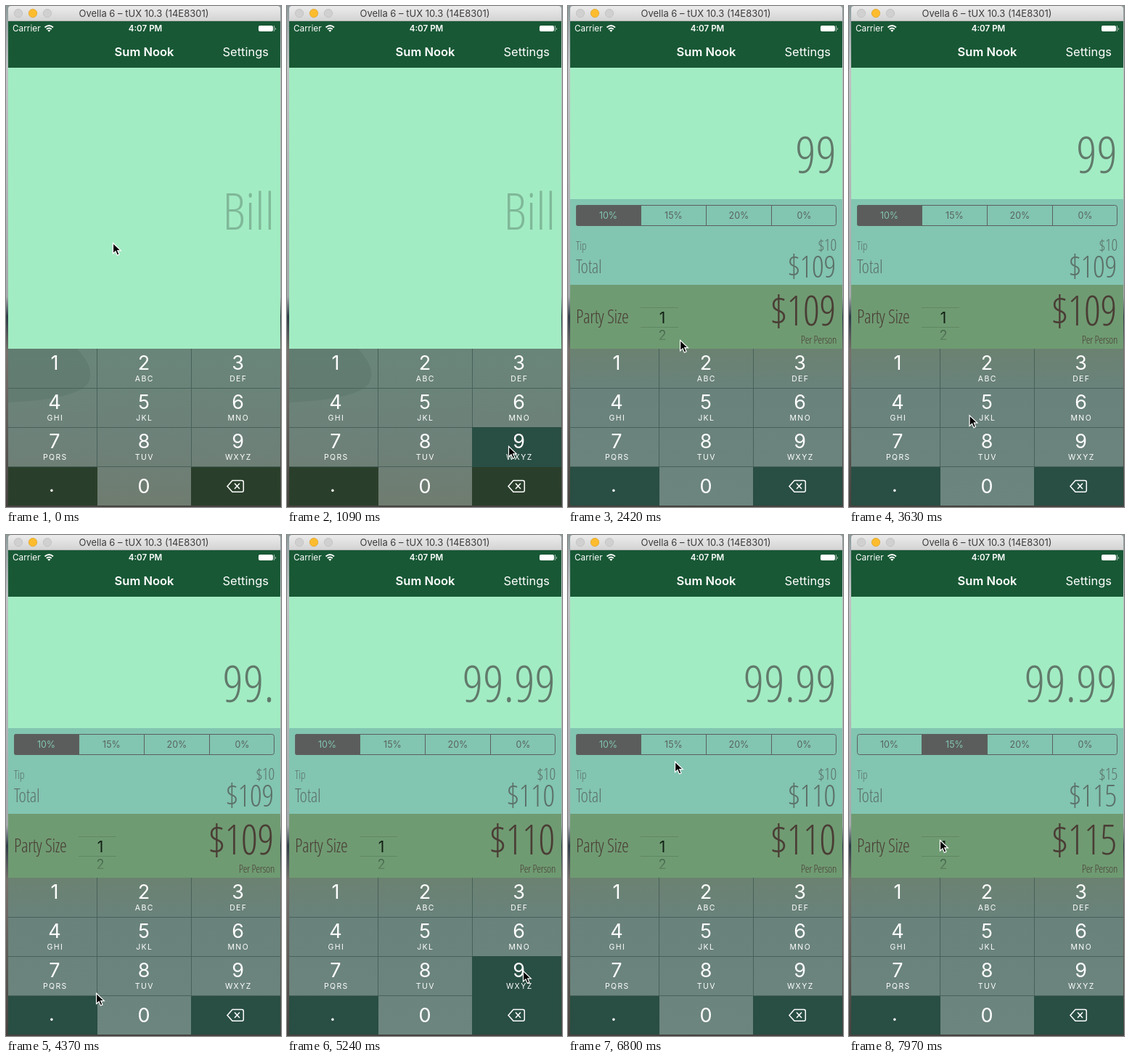
An HTML page for the animation above (8 s loop, 379 px wide and 690 px high).

```html
<!DOCTYPE html>
<html lang="en">
<head>
<meta charset="utf-8">
<style>
html, body { margin: 0; width: 100%; height: 100%; overflow: hidden; }
svg { display: block; width: 379px; height: 690px; font-family: Inter, "Open Sans", sans-serif; }
.narrow { font-family: "Open Sans", "Noto Sans", sans-serif; font-stretch: 82%; font-weight: 350; letter-spacing: -.02em; }
#bill { font-weight: 320; letter-spacing: 0; }
.end { text-anchor: end; }
.mid { text-anchor: middle; }
</style>
</head>
<body>
<svg viewBox="0 0 379 690">
  <defs>
    <linearGradient id="desk" x2="0" y2="1">
      <stop offset="0" stop-color="#8d9a9c"/><stop offset=".12" stop-color="#c0c4c6"/>
      <stop offset=".58" stop-color="#a4a9ab"/><stop offset=".62" stop-color="#303c48"/>
      <stop offset=".69" stop-color="#77716c"/><stop offset="1" stop-color="#45423f"/>
    </linearGradient>
    <linearGradient id="bar" x2="0" y2="1">
      <stop stop-color="#ececec"/><stop offset="1" stop-color="#d3d3d3"/>
    </linearGradient>
    <linearGradient id="padA" x2="0" y2="1">
      <stop stop-color="#698579"/><stop offset=".6" stop-color="#6d8179"/><stop offset="1" stop-color="#6f7c70"/>
    </linearGradient>
    <linearGradient id="padB" x2="0" y2="1">
      <stop stop-color="#6b8271"/><stop offset=".25" stop-color="#69827b"/><stop offset="1" stop-color="#6c857e"/>
    </linearGradient>
    <linearGradient id="fade" x2="0" y2="1">
      <stop stop-color="#34503a" stop-opacity=".85"/><stop offset="1" stop-color="#34503a" stop-opacity=".2"/>
    </linearGradient>
    <clipPath id="view"><path d="M3 85H378V472H3Z"/></clipPath>
    <clipPath id="wheel"><path d="M100 446H152V461H100Z"/></clipPath>
  </defs>

  <path fill="url(#desk)" d="M0 0H379V690H0Z"/>
  <path fill="url(#bar)" d="M3 21V4Q3 0 7 0H374Q378 0 378 4V21Z"/>
  <path stroke="#b4b4b4" d="M3 20.5H378"/>
  <g stroke="#bcbcbc" stroke-width=".7" fill="#d0d0d0">
    <circle cx="17" cy="10" r="5.7"/><circle cx="57" cy="10" r="5.7"/>
    <circle cx="37" cy="10" r="5.7" fill="#fdbc2e" stroke="#dfa023"/>
  </g>
  <text class="mid" x="190" y="15" font-size="13" fill="#3c3c3c">Ovella 6 – tUX 10.3 (14E8301)</text>

  <path fill="#185835" d="M3 21H378V85H3Z"/>
  <g fill="#fff">
    <text x="9" y="35" font-size="11.8">Carrier</text>
    <text class="mid" x="192" y="35" font-size="11.6" font-weight="600">4:07 PM</text>
    <text class="mid" x="190.5" y="69" font-size="16.5" font-weight="600">Sum Nook</text>
    <text class="end" x="362" y="69" font-size="16.5">Settings</text>
    <path d="M348 29Q348 27 350 27H366Q368 27 368 29V33Q368 35 366 35H350Q348 35 348 33Z"/>
    <path fill="none" stroke="#fff" stroke-opacity=".6" d="M369.5 27V35M371.5 30V33"/>
    <path fill="none" stroke="#fff" stroke-width="1.7" d="M53.5 29.5Q59.3 24.5 65 29.5M55.8 32Q59.3 29 62.8 32"/>
    <path d="M57.2 33.5Q59.3 32 61.4 33.5L59.3 35.7Z"/>
  </g>

  <g clip-path="url(#view)">
    <path fill="#a2ecc3" d="M3 85H378V472H3Z"/>
    <text id="bill" class="narrow end" x="370" font-size="71"></text>
    <g id="panel">
      <path fill="#82c5b1" d="M3 266H378V384H3Z"/>
      <path fill="#6f9b72" d="M3 384H378V620H3Z"/>
      <g id="segs" font-size="12.5"></g>
      <path fill="none" stroke="#5c5f5d" d="M14.5 274.5H366.5Q369.5 274.5 369.5 277.5V299.5Q369.5 302.5 366.5 302.5H14.5Q11.5 302.5 11.5 299.5V277.5Q11.5 274.5 14.5 274.5ZM100.5 274V303M190.5 274V303M280.5 274V303"/>
      <g class="narrow" fill="#5c7169">
        <text x="11" y="336" font-size="15.5">Tip</text>
        <text x="11" y="368" font-size="25">Total</text>
        <text id="tip" class="end" x="370" y="337" font-size="22"></text>
        <text id="total" class="end" x="369" y="374" font-size="42"></text>
      </g>
      <g class="narrow" fill="#4a3d35">
        <text x="11" y="437" font-size="25">Party Size</text>
        <text id="each" class="end" x="369" y="440" font-size="57"></text>
        <text class="end" x="370" y="465" font-size="15">Per Person</text>
      </g>
      <path stroke="#5f8763" d="M100 415.5H152M100 442.5H152"/>
      <text class="mid" x="130" y="437" font-size="21" fill="#122016">1</text>
      <text class="mid" clip-path="url(#wheel)" x="130" y="460" font-size="18" fill="url(#fade)">2</text>
    </g>
  </g>

  <path fill="url(#padA)" d="M3 472H378V688H3Z"/>
  <path fill="#4f6a5c" opacity=".3" d="M3 472H98Q124 500 113 520Q95 542 3 546Z"/>
  <path fill="#2a3f2b" d="M3 634H126V688H3ZM255 634H378V688H255Z"/>
  <g id="tint">
    <path fill="url(#padB)" d="M3 472H378V688H3Z"/>
    <path fill="#294e43" d="M3 634H126V688H3ZM255 634H378V688H255Z"/>
  </g>
  <path id="dot" fill="#6c857e" d="M3 634H126V688H3Z"/>
  <path stroke="#48615a" d="M3 526.5H378M3 580.5H378M3 634.5H378M125.5 472V634M255.5 472V634"/>
  <path id="nine" fill="#294e43" d="M255 580H378V635H255Z"/>
  <g id="keys" class="mid" fill="#fff"></g>
  <path fill="none" stroke="#fff" stroke-width="1.5" d="M312 653.5H325Q327.3 653.5 327.3 656V667Q327.3 669.3 325 669.3H312L305 661.4ZM315 657.5L322 665M322 657.5L315 665"/>

  <path id="mouse" fill="#000" stroke="#fff" stroke-width="1.2" d="M.5 .5V15L4 11.8L6.3 17.3L9 16.1L6.7 10.8H11.3Z"/>
</svg>
<script>
const $ = id => document.getElementById(id);
const LOOP = 8000;
const rates = [10, 15, 20, 0];
// [time, x, y] of the pointer tip
const path = [
  [60, 147, 326], [230, 353, 254], [420, 8, 500], [560, 150, 636], [730, 305, 606],
  [2190, 305, 606], [2420, 154, 460], [2530, 164, 447], [2710, 164, 447], [2940, 353, 647],
  [3050, 353, 647], [3110, 352, 651], [3330, 200, 538], [3450, 166, 563], [3630, 166, 563],
  [3870, 70, 650], [4130, 70, 650], [4370, 123, 631], [4430, 186, 615], [4700, 325, 600],
  [5600, 325, 600], [5830, 117, 454], [6010, 117, 454], [6400, 138, 385], [6800, 147, 312],
  [6860, 150, 297], [6920, 150, 297], [7140, 152, 285], [7500, 152, 284], [7670, 152, 284], [7970, 125, 420]
];
const typed = [[0, ""], [1150, "9"], [1350, "99"], [3990, "99."], [4810, "99.9"], [5120, "99.99"]];

const letters = ["", "ABC", "DEF", "GHI", "JKL", "MNO", "PQRS", "TUV", "WXYZ"];
const colX = [67, 190, 319.5];
$("keys").innerHTML = letters.map((s, i) => {
  const x = colX[i % 3], y = 501 + 54 * Math.floor(i / 3);
  return `<text x="${x}" y="${y}" font-size="27">${i + 1}</text>` +
    `<text x="${x + .8}" y="${y + 16}" font-size="10.5" letter-spacing="1.4">${s}</text>`;
}).join("") + `<text x="190" y="671" font-size="27">0</text><text x="63" y="669" font-size="27">.</text>`;

$("segs").innerHTML = rates.map((r, i) =>
  `<rect x="${11 + 90 * i}" y="274" width="90" height="29" rx="${i % 3 ? 0 : 3}" fill="#5b5d5c"/>` +
  `<text class="mid" x="${55.5 + 90 * i}" y="293">${r}%</text>`).join("");
const boxes = [...$("segs").querySelectorAll("rect")];
const labels = [...$("segs").querySelectorAll("text")];

const between = (t, a, b) => t >= a && t < b;
const show = (id, on) => $(id).style.display = on ? "" : "none";
const money = v => "$" + Math.round(v);

function ease(t, start, length) {
  const p = Math.max(0, Math.min(1, (t - start) / length));
  return p * p * (3 - 2 * p);
}

function pointer(t) {
  const i = path.findIndex(k => k[0] > t);
  if (i < 0) return path[path.length - 1].slice(1);
  if (!i) return path[0].slice(1);
  const [t0, x0, y0] = path[i - 1], [t1, x1, y1] = path[i];
  const p = (t - t0) / (t1 - t0);
  return [x0 + (x1 - x0) * p, y0 + (y1 - y0) * p];
}

function draw(t) {
  const text = typed.filter(k => k[0] <= t).pop()[1];
  const sum = parseFloat(text) || 0;
  const pick = t < 7200 ? 0 : 1;
  const rate = rates[pick] / 100;
  const open = ease(t, 1210, 268);

  $("bill").textContent = text || "Bill";
  $("bill").setAttribute("fill", text ? "#617a6b" : "#7fb898");
  $("bill").setAttribute("y", 308 - 78 * open);
  $("panel").setAttribute("transform", `translate(0 ${136 * (1 - open)})`);
  $("panel").setAttribute("opacity", Math.min(1, open * 1.2));
  $("tint").setAttribute("opacity", Math.min(1, open * 1.2));

  $("tip").textContent = money(sum * rate);
  $("total").textContent = $("each").textContent = money(sum * (1 + rate));
  boxes.forEach((b, i) => {
    const held = i === 1 && between(t, 7080, 7200);
    b.setAttribute("opacity", i === pick ? 1 : held ? .25 : 0);
    labels[i].setAttribute("fill", i === pick ? "#82c5b1" : "#59645f");
  });

  show("nine", between(t, 1090, 1240) || between(t, 1330, 1470) || between(t, 4800, 4930) || between(t, 5110, 5300));
  show("dot", between(t, 3980, 4130));
  $("mouse").setAttribute("transform", `translate(${pointer(t)})`);
}

const begin = performance.now();
function tick(now) {
  draw(Math.max(0, now - begin) % LOOP);
  requestAnimationFrame(tick);
}
draw(0);
requestAnimationFrame(tick);
</script>
</body>
</html>
```
